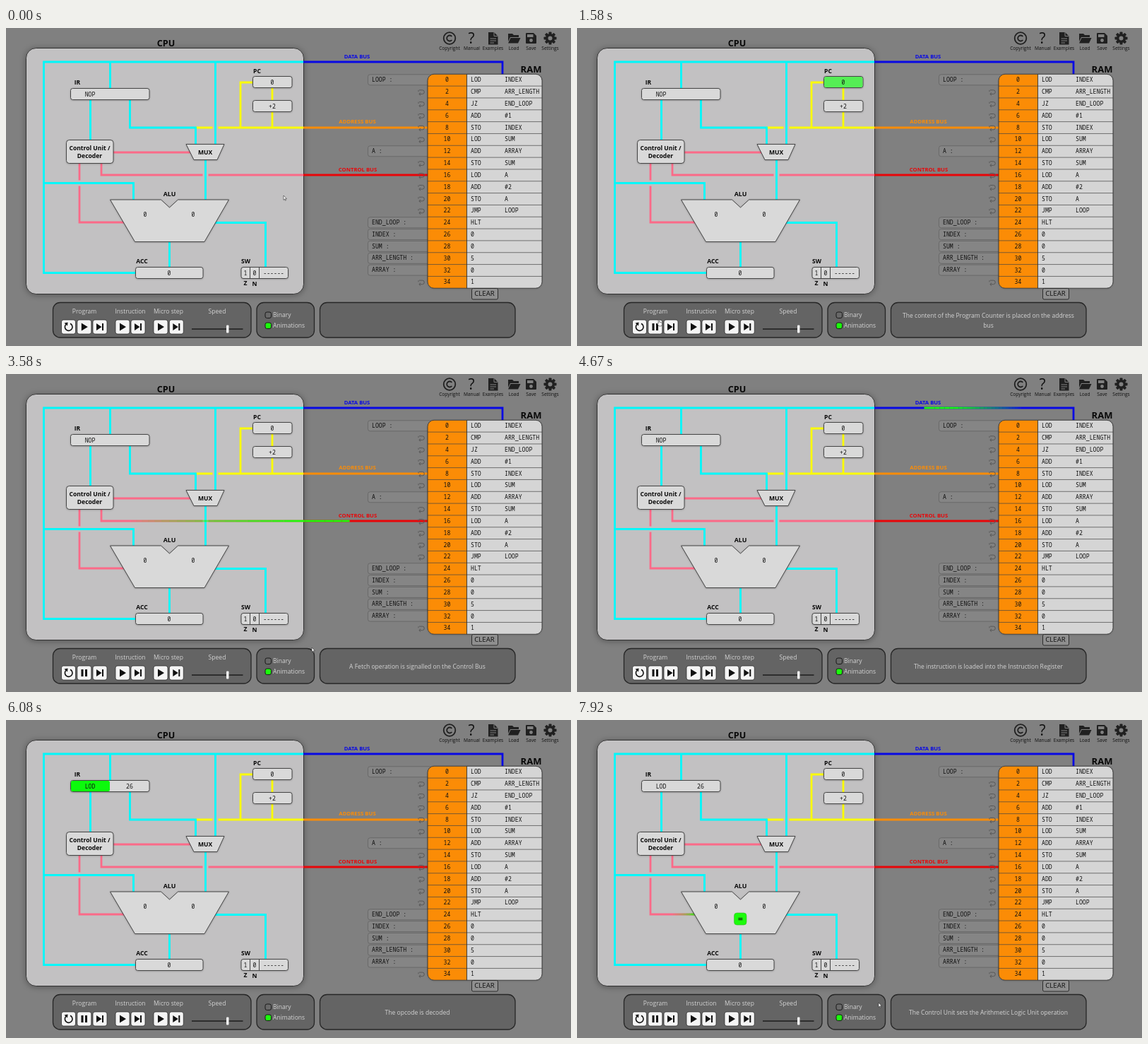
Recreate the animation shown at these times as an HTML page. Size 800 px wide and 450 px high, loop 8000 ms.

```html
<!DOCTYPE html>
<html lang="en">
<head>
<meta charset="utf-8">
<title>CPU simulator</title>
<style>
html, body { margin: 0; width: 100%; height: 100%; overflow: hidden; background: #808080; }
svg { display: block; width: 800px; height: 450px; }
text { font: 8.55px "Open Sans", "Noto Sans", sans-serif; fill: #111; text-anchor: middle; white-space: pre; }
.bold { font-weight: 700; fill: #080808; }
.mono { font: 8.2px "Noto Sans Mono", "DejaVu Sans Mono", monospace; }
.left { text-anchor: start; }
.light { fill: #d4d4d4; }
.wire { fill: none; stroke-width: 2.8; }
.box { fill: #d9d9d9; stroke: #383838; stroke-width: .9; }
.panel { fill: #646464; stroke: #262626; stroke-width: 1.3; }
.flash { fill: #0cfa0c; opacity: 0; }
.line { fill: none; stroke: #333; stroke-width: .9; }
</style>
</head>
<body>
<svg id="stage" viewBox="0 0 800 450" xmlns="http://www.w3.org/2000/svg"></svg>
<script>
const stage = document.getElementById('stage');
const CYAN = '#00f8fa', YELLOW = '#fbfb00', PINK = '#fb6a88', ORANGE = '#fb8c06', BLUE = '#0808e4', RED = '#e80508';
const PANEL = '#c2c1c2', GREEN = '#1cfb0c', DARK = '#202020';

const text = (x, y, s, cls = '', size = 0, style = '') =>
  `<text x="${x}" y="${y}" class="${cls}" style="${size ? `font-size:${size}px;` : ''}${style}">${s}</text>`;
const rect = (x, y, w, h, r, attrs) =>
  `<rect x="${x}" y="${y}" width="${w}" height="${h}" rx="${r}" ${attrs}/>`;
const wire = (d, color) => `<path class="wire" d="${d}" stroke="${color}"/>`;
const halo = d => `<path d="${d}" stroke="${PANEL}" stroke-width="8"/>`;
const shape = (d, fill, more = '') => `<path d="${d}" fill="${fill}" ${more}/>`;
const flash = (id, x, y, w, h, r = 2.5) => rect(x, y, w, h, r, `id="${id}" class="flash"`);
const box = (x, y, w, h, r = 3) => rect(x + .5, y + .5, w - .5, h - 1, r, 'class="box" filter="url(#soft)"');

// Cyan wires run over the others, which are interrupted at each crossing.
function wires() {
  return wire('M152 176H261M135 191V208H421M104 191V275H168', PINK)
    + wire('M268 141H421M332 141V77H350M377 85V102M377 119V141', YELLOW)
    + halo('M296.500 137V145M282.500 204V212M100 219.500H108')
    + wire('M421 48H53.500V346.500H183M53.500 219.500H180.500V243M147.500 48V85M296.500 48V164', CYAN)
    + wire('M119.500 102V158M175.500 102V141H268.500V164M282.500 187V243', CYAN)
    + wire('M296 275.500H367.500V338M231.500 303V338', CYAN)
    + wire('M421 48H703V66', BLUE) + wire('M421 141H597', ORANGE) + wire('M421 208H597', RED);
}

function cpuUnits() {
  return box(91, 85, 112, 17) + flash('irAll', 92, 86, 110.5, 15) + flash('irOp', 92, 86, 55, 15)
    + `<text id="opcode" x="119" y="96.5" class="mono">NOP</text><text id="operand" x="175" y="96.5" class="mono"></text>`
    + text(101, 80, 'IR', 'bold')
    + box(349, 68, 56, 17) + flash('pc', 350, 69, 54.5, 15) + text(377, 80, '0', 'mono') + text(355.5, 64, 'PC', 'bold')
    + box(349, 102, 56, 17) + text(377, 113.5, '+2', 'mono')
    + box(85, 158, 67, 34, 4) + flash('cu', 86, 159, 65.5, 32, 3.5)
    + text(118.5, 173, 'Control Unit /', 'bold') + text(118.5, 184, 'Decoder', 'bold')
    + shape('M255 164.500H309L299 186.500H266Z', '', 'class="box" filter="url(#soft)"') + text(282, 178.5, 'MUX', 'bold')
    + shape('M147.500 243H219.500L231.500 254L243.500 243H315.500L281 302.500H182.500Z', '', 'class="box" filter="url(#soft)"')
    + text(231.5, 238, 'ALU', 'bold', 8.8) + text(197, 266.5, '0', 'mono') + text(265, 266.5, '0', 'mono')
    + `<g id="aluOp" opacity="0">${rect(222.5, 273, 17.5, 17, 4, `fill="${GREEN}" stroke="#39b830" stroke-width=".6"`)}`
    + `${text(231.3, 286, '=', 'mono', 13)}</g>`
    + box(183, 338, 96, 17) + text(231, 349.5, '0', 'mono') + text(192.5, 333, 'ACC', 'bold')
    + box(332.5, 338, 67, 17) + '<path class="line" d="M345.500 338.500V354.500M358.500 338.500V354.500"/>'
    + text(339, 349.5, '1', 'mono') + text(352, 349.5, '0', 'mono') + text(379, 349.5, '------', 'mono')
    + text(339.5, 333, 'SW', 'bold') + text(339, 364, 'Z', 'bold') + text(352, 364.5, 'N', 'bold');
}

function ram() {
  const program = ['LOD INDEX', 'CMP ARR_LENGTH', 'JZ END_LOOP', 'ADD #1', 'STO INDEX', 'LOD SUM', 'ADD ARRAY', 'STO SUM',
    'LOD A', 'ADD #2', 'STO A', 'JMP LOOP', 'HLT', '0', '0', '5', '0', '1'];
  const labels = { 0: 'LOOP', 6: 'A', 12: 'END_LOOP', 13: 'INDEX', 14: 'SUM', 15: 'ARR_LENGTH', 16: 'ARRAY' };
  const top = 65.3, step = 16.83, height = step * 18;
  let back = '', front = '';
  program.forEach((row, i) => {
    const y = top + i * step, [op, arg = ''] = row.split(' ');
    if (i in labels) {
      back += rect(512.5, y + .5, 90, 15, 3, 'fill="#858585" stroke="#626262" stroke-width=".8"')
        + text(518, y + 10.7, labels[i] + ' :', 'mono left');
    } else {
      back += `<path transform="translate(588 ${y + 8.5})" fill="none" stroke="#585858" d="M-3 -2.800H1.500A2.700 2.700 0 0 1 1.500 2.800H-3M-1 .8L-3.200 2.800L-1 4.800M-4 -2.800V-.500"/>`;
    }
    if (i) front += `<path d="M597 ${y}H759" stroke="#444" stroke-width=".7"/>`;
    front += text(624.5, y + 11, i * 2, 'mono') + text(658, y + 11, op, 'mono left') + text(706, y + 11, arg, 'mono left');
  });
  return back + rect(597, top, 162, height, 9, 'fill="#d5d5d5" filter="url(#soft)"')
    + `<g clip-path="url(#ramClip)">${rect(597, top, 55.5, height, 0, `fill="${ORANGE}"`)}`
    + flash('rowAddress', 597, top, 55.5, step, 0) + flash('rowContent', 652.5, top, 107, step, 0)
    + front + '<path class="line" d="M652.500 65V369"/></g>'
    + rect(597, top, 162, height, 9, 'class="line"')
    + text(743.5, 62.5, 'RAM', 'bold', 13)
    + rect(659.5, 368.5, 37, 15.5, 2, 'fill="#8f8f8f" stroke="#222" stroke-width=".9"') + text(677.5, 379.3, 'CLEAR', '', 9.6);
}

function toolbar() {
  const names = [['Copyright', 628], ['Manual', 659.5], ['Examples', 689.5], ['Load', 719], ['Save', 743.5], ['Settings', 770.5]];
  let teeth = '';
  for (let a = 0; a < 360; a += 45) teeth += rect(-2, -9, 4, 5, .8, `fill="${DARK}" transform="rotate(${a})"`);
  return names.map(([s, x]) => text(x, 31, s, '', 6.6)).join('')
    + `<circle cx="628" cy="14.500" r="8.300" fill="none" stroke="${DARK}" stroke-width="1.800"/>`
    + `<path d="M631.300 12A4 4 0 1 0 631.300 17" fill="none" stroke="${DARK}" stroke-width="1.800"/>`
    + text(659, 22, '?', '', 21, 'font-weight:500')
    + shape('M683 6H691L696.500 11.500V23.500H683Z', DARK)
    + '<path d="M691 6V11.500H696.500M685.500 15H694M685.500 18H694M685.500 21H691" fill="none" stroke="#808080"/>'
    + shape('M711 8H717L719 10H726V13H714L711 19ZM714.500 14H728.500L725 21.500H711Z', DARK)
    + shape('M736 8Q736 7 737 7H747L751 11V21Q751 22 750 22H737Q736 22 736 21Z', DARK)
    + rect(738, 9, 8.5, 4, 0, 'fill="#808080"') + '<circle cx="743.500" cy="17.500" r="2.400" fill="#808080"/>'
    + `<g transform="translate(770.500 14.500)">${teeth}<circle r="4.800" fill="none" stroke="${DARK}" stroke-width="3.600"/></g>`;
}

function controls() {
  const play = x => shape(`M${x - 4} 417.500L${x + 5} 423L${x - 4} 428.500Z`, '#111');
  const skip = x => shape(`M${x - 5} 418L${x + 2.5} 423L${x - 5} 428ZM${x + 3} 418H${x + 5}V428H${x + 3}Z`, '#111');
  const buttons = [88.5, 110.8, 133, 165, 187, 219, 241.3];
  return [[66.5, 280.5], [355, 81.5], [444.5, 276.5]].map(([x, w]) => rect(x, 388.5, w, 49.5, 10, 'class="panel"')).join('')
    + [['Program', 111], ['Instruction', 176], ['Micro step', 230], ['Speed', 299]].map(([s, x]) => text(x, 403.5, s, 'light')).join('')
    + buttons.map(x => rect(x - 10, 413, 20, 20, 3, 'fill="#f4f4f4" stroke="#222" stroke-width=".7"')).join('')
    + '<path d="M85 419.300A5.300 5.300 0 1 0 91 418.300" fill="none" stroke="#111" stroke-width="1.600"/>'
    + shape('M82.500 417.500L87.500 416.500L87 421.500Z', '#111')
    + `<g id="playIcon">${play(110.8)}</g>`
    + `<g id="pauseIcon">${shape('M106.500 418H109.500V428H106.500ZM112 418H115V428H112Z', '#111')}</g>`
    + play(165) + play(219) + skip(133) + skip(187) + skip(241.3)
    + '<path d="M263 426H335.500" stroke="#1c1c1c" stroke-width="1.500"/>' + rect(312, 420.5, 3.5, 11, 1, 'fill="#f2f2f2"')
    + rect(367, 402, 8.5, 8.5, 2.5, 'fill="#686868" stroke="#181818"')
    + rect(367, 417, 8.5, 8.5, 2.5, `fill="${GREEN}" stroke="#181818"`)
    + text(378, 409, 'Binary', 'light left') + text(378, 424, 'Animations', 'light left')
    + '<text id="message1" x="582.500" class="light"></text><text id="message2" x="582.500" y="424" class="light"></text>';
}

const SEGMENTS = 24;
const cursorStyle = 'stroke="#222" stroke-width=".7" transform="scale(.8)"';
stage.innerHTML = `<defs>
  <filter id="soft" x="-20%" y="-20%" width="140%" height="150%"><feDropShadow dx="0" dy=".6" stdDeviation="1.200" flood-opacity=".25"/></filter>
  <filter id="deep"><feDropShadow dx="0" dy="1" stdDeviation="4" flood-opacity=".35"/></filter>
  <clipPath id="ramClip">${rect(597, 65.3, 162, 302.9, 9, '')}</clipPath></defs>`
  + rect(0, 0, 800, 450, 0, 'fill="#808080"')
  + rect(28.5, 28.5, 393, 348, 14, `fill="${PANEL}" stroke="#333" filter="url(#deep)"`)
  + text(226.5, 25.5, 'CPU', 'bold', 12.6)
  + wires()
  + `<g id="pulse">${wire('', GREEN).repeat(SEGMENTS)}</g>`
  + text(497, 43, 'DATA BUS', 'bold', 7.7, `fill:${BLUE}`)
  + text(497.5, 135, 'ADDRESS BUS', 'bold', 7.8, `fill:${ORANGE}`)
  + text(498, 202.5, 'CONTROL BUS', 'bold', 7.7, `fill:${RED}`)
  + cpuUnits() + ram() + toolbar() + controls()
  + `<g id="arrow">${shape('M0 0V8L1.800 6.300L3 9L4.200 8.500L3 5.800H5.500Z', '#fff', cursorStyle)}</g>`
  + `<g id="hand">${shape('M-1 0Q0 -1 1 0V4L5 5Q6 5.500 5.500 8L4.500 11H0L-3 7Q-3 5.500 -1 6.500Z', '#fff', cursorStyle)}</g>`;

const LOOP = 8000, PLAY = 1400, LOADED = 5230;
const messages = [
  [0, ''],
  [PLAY, 'The content of the Program Counter is placed on the address', 'bus'],
  [3000, 'A Fetch operation is signalled on the Control Bus'],
  [3930, 'The instruction is loaded into the Instruction Register'],
  [5760, 'The opcode is decoded'],
  [7120, 'The Control Unit sets the Arithmetic Logic Unit operation'],
];
// id, start, end
const flashes = [['pc', 1480, 2040], ['rowAddress', 2420, 3000], ['rowContent', 3950, 4450],
  ['irAll', 5080, 5700], ['irOp', 5800, 6330], ['cu', 6560, 7150]];
// start, duration, tail as a share of the duration, path
const pulses = [
  [1860, 800, .3, 'M350 77H332V141H597'],
  [3090, 800, .3, 'M135 191V208H597'],
  [4294, 830, .12, 'M703 65V48H147.500V85'],
  [6180, 500, .3, 'M119.500 102V158'],
  [7184, 800, .3, 'M104 191V275H168'],
];
const cursorStops = [[0, 393, 237], [120, 393, 237], [830, 115, 413], [1640, 116, 413], [2450, 386, 271],
  [2850, 386, 271], [3580, 433, 387], [3950, 440, 456], [7580, 425, 456], [7920, 427, 400], [8000, 427, 400]];

const el = id => document.getElementById(id);
const clamp = v => Math.min(1, Math.max(0, v));
const smooth = v => (v = clamp(v), v * v * (3 - 2 * v));
const cubic = v => (v = clamp(v), v < .5 ? 4 * v ** 3 : 1 - 4 * (1 - v) ** 3);
const show = (id, on) => el(id).setAttribute('opacity', +on);

function drawPulse(t) {
  const active = pulses.find(([start, duration, tail]) => t >= start && t < start + duration * (1 + tail));
  show('pulse', !!active);
  if (!active) return;
  const [start, duration, tail, d] = active, u = (t - start) / duration;
  [...el('pulse').children].forEach((segment, i) => {
    segment.setAttribute('d', d);
    const length = segment.getTotalLength();
    const at = k => cubic(u - tail * (1 - k / SEGMENTS)) * length;
    segment.setAttribute('stroke-opacity', clamp(1.3 * (i + 1) / SEGMENTS));
    segment.setAttribute('stroke-dasharray', `0 ${at(i)} ${at(i + 1) - at(i)} 9999`);
  });
}

function drawCursor(t) {
  const i = cursorStops.findIndex(([time]) => time > t);
  const [t0, x0, y0] = cursorStops[i - 1], [t1, x1, y1] = cursorStops[i];
  const k = smooth((t - t0) / (t1 - t0));
  const place = `translate(${x0 + (x1 - x0) * k} ${y0 + (y1 - y0) * k})`;
  const overButton = t > 780 && t < 1740;
  for (const id of ['arrow', 'hand']) {
    el(id).setAttribute('transform', place);
    show(id, (id === 'hand') === overButton);
  }
}

function frame(now) {
  const t = now % LOOP;
  const [, first, second = ''] = messages.findLast(([start]) => t >= start);
  el('message1').textContent = first;
  el('message1').setAttribute('y', second ? 410 : 416.5);
  el('message2').textContent = second;
  show('playIcon', t < PLAY);
  show('pauseIcon', t >= PLAY);
  el('opcode').textContent = t < LOADED ? 'NOP' : 'LOD';
  el('operand').textContent = t < LOADED ? '' : '26';
  for (const [id, start, end] of flashes)
    el(id).style.opacity = smooth((t - start) / 170) * smooth((end - t) / 200);
  show('aluOp', smooth((t - 7730) / 150));
  drawPulse(t);
  drawCursor(t);
  requestAnimationFrame(() => frame(performance.now()));
}
frame(performance.now());
</script>
</body>
</html>
```
